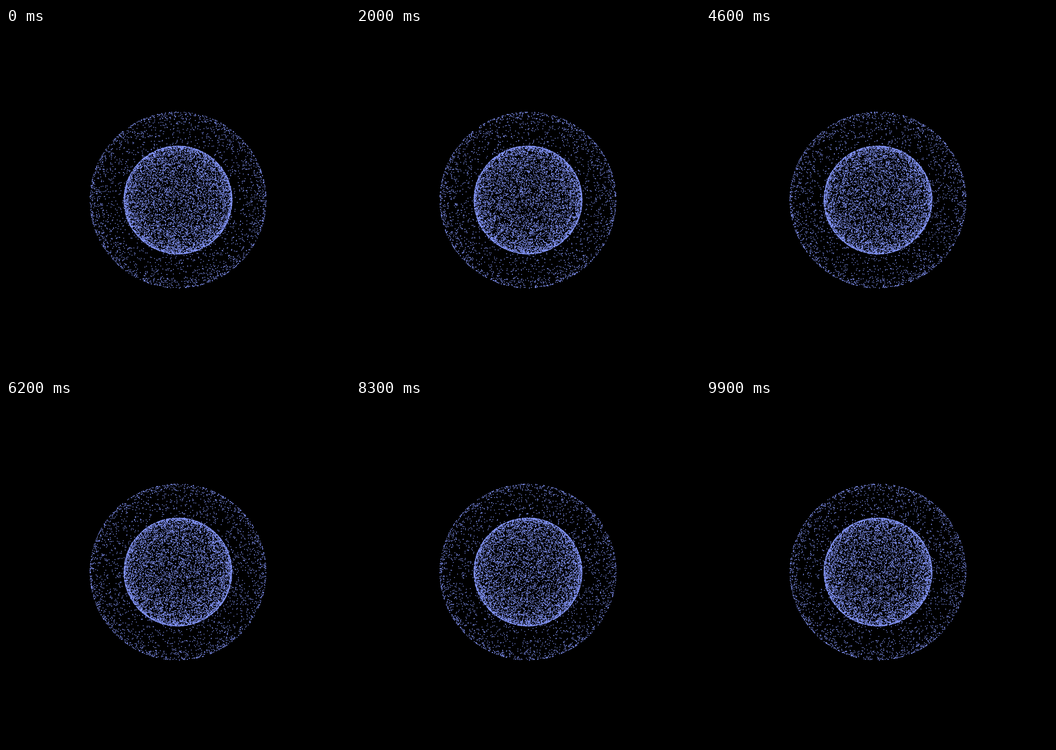
These frames come from a looping animation (748 px wide and 748 px high, 10000 ms). An HTML page with a canvas:

```html
<!DOCTYPE html>
<html lang="en">
<head>
<meta charset="utf-8">
<title>Particle spheres</title>
<style>
  html, body { margin: 0; width: 100%; height: 100%; overflow: hidden; background: #000; }
  canvas { display: block; }
</style>
</head>
<body>
<canvas id="stage" width="748" height="748"></canvas>
<script>
const ctx = document.getElementById("stage").getContext("2d");
const SIZE = 748, MID = SIZE / 2;
const LOOP = 10000, STEP = 100;
const SPIN = 0.05; // radians per second
const DOT = 1.65;

let seed = 20731;
function random() {
  seed = (seed + 0x6d2b79f5) | 0;
  let t = Math.imul(seed ^ (seed >>> 15), 1 | seed);
  t = (t + Math.imul(t ^ (t >>> 7), 61 | t)) ^ t;
  return ((t ^ (t >>> 14)) >>> 0) / 4294967296;
}

// Even spread over the surface of a sphere
function sphere(count, radius) {
  return Array.from({ length: count }, () => {
    const h = random() * 2 - 1;
    return { y: h * radius, ring: Math.sqrt(1 - h * h) * radius, angle: random() * Math.PI * 2 };
  });
}

const dots = [...sphere(3000, 191.5), ...sphere(7000, 117.5)];

function draw(ms) {
  const turn = SPIN * ms / 1000;
  ctx.fillStyle = "#000";
  ctx.fillRect(0, 0, SIZE, SIZE);
  ctx.fillStyle = "#8799ff";
  for (const d of dots) {
    const x = MID + d.ring * Math.sin(d.angle + turn);
    ctx.fillRect(x - DOT / 2, MID + d.y - DOT / 2, DOT, DOT);
  }
}

const start = performance.now();
let shown = -1;
function tick() {
  const ms = (performance.now() - start) % LOOP;
  const step = Math.floor(ms / STEP);
  if (step !== shown) {
    shown = step;
    draw(step * STEP);
  }
  requestAnimationFrame(tick);
}
tick();
</script>
</body>
</html>
```
